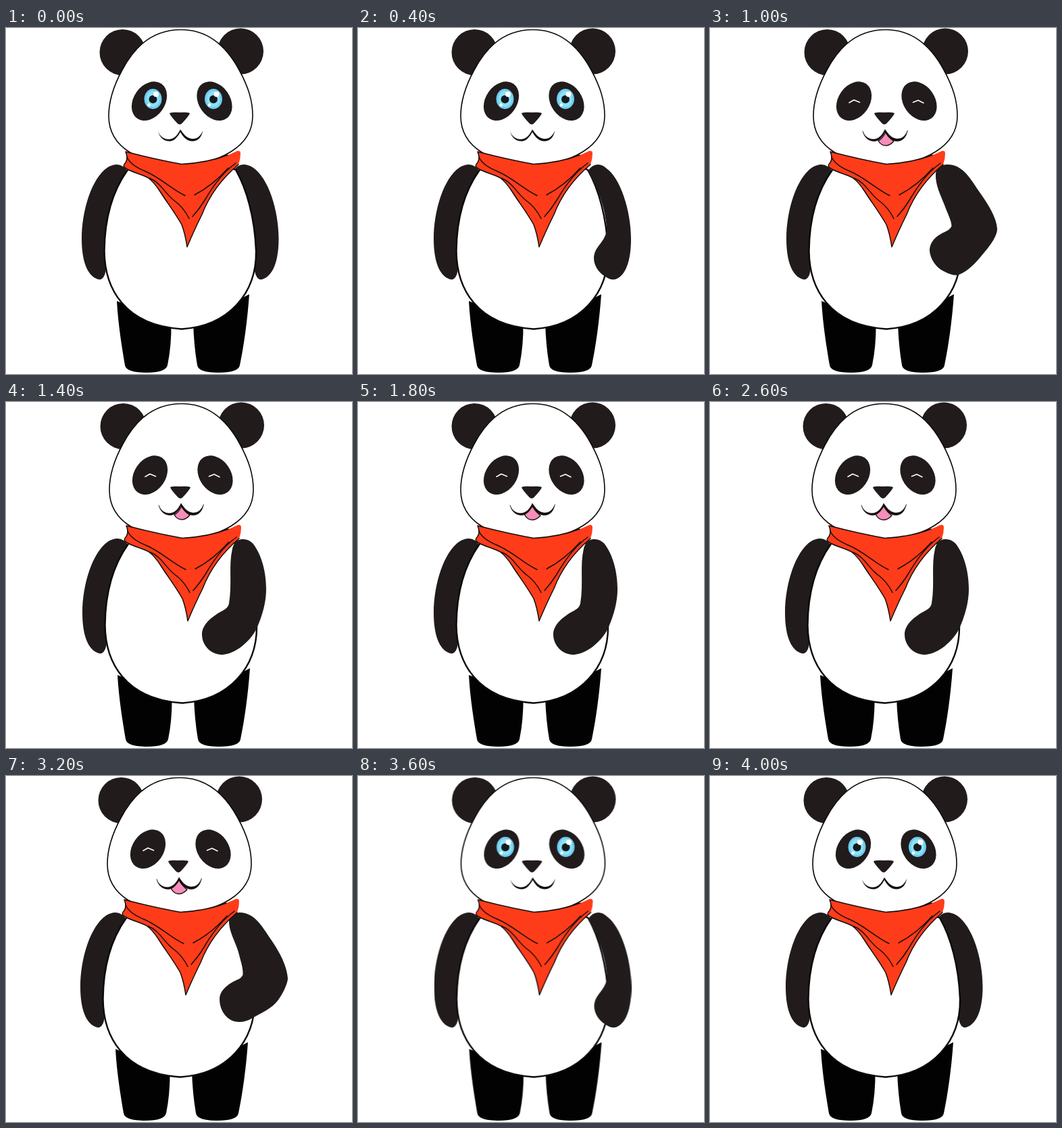
Animation, 512 px wide and 512 px high, one loop 4200 ms. Source, as an HTML page:

```html
<!DOCTYPE html>
<html lang="en">
<head>
<meta charset="utf-8">
<title>Panda rubbing its belly</title>
<style>
  html, body { margin: 0; width: 100%; height: 100%; overflow: hidden; background: #fff; }
  svg { display: block; width: 100vw; height: 100vh; }

  .fur { fill: #211b1c; }
  .skin { fill: #fff; stroke: #0b0909; }
  .line { fill: none; stroke: #120d0d; stroke-linecap: round; stroke-linejoin: round; }
  .shine { fill: #fff; }

  /* Every change is a hard cut on a 200 ms grid */
  .sway, .pose { animation: 4200ms step-end infinite; }
  .pose { visibility: hidden; }
  .sway { animation-name: sway; }
  .rest { animation-name: rest; }
  .curl { animation-name: curl; }
  .belly { animation-name: belly; }
  .lift { animation-name: lift; }
  .out { animation-name: out; }
  .awake { animation-name: awake; }
  .happy { animation-name: happy; }
  .tongue-a { animation-name: tongue-a; }
  .tongue-b { animation-name: tongue-b; }

  @keyframes sway {
    0%, 9.523%, 42.857%, 80.952%, 95.238% { transform: translateX(0); }
    4.761%, 14.285%, 38.095%, 52.38%, 85.714% { transform: translateX(.5px); }
    19.047% { transform: translateX(1px); }
    61.904%, 71.428% { transform: translateX(-1px); }
    66.666% { transform: translateX(-1.4px); }
    76.19% { transform: translateX(-2px); }
  }
  @keyframes rest {
    0%, 90.476% { visibility: visible; }
    9.523% { visibility: hidden; }
  }
  @keyframes curl {
    0%, 14.285%, 33.333%, 61.904%, 90.476% { visibility: hidden; }
    9.523%, 28.571%, 57.142%, 80.952% { visibility: visible; }
  }
  @keyframes belly {
    0%, 23.809%, 47.619%, 76.19% { visibility: hidden; }
    14.285%, 33.333%, 61.904% { visibility: visible; }
  }
  @keyframes lift {
    0%, 52.38%, 80.952% { visibility: hidden; }
    47.619%, 76.19% { visibility: visible; }
  }
  @keyframes out {
    0%, 28.571%, 57.142% { visibility: hidden; }
    23.809%, 52.38% { visibility: visible; }
  }
  @keyframes awake {
    0%, 85.714% { visibility: visible; }
    14.285% { visibility: hidden; }
  }
  @keyframes happy {
    0%, 85.714% { visibility: hidden; }
    14.285% { visibility: visible; }
  }
  @keyframes tongue-a {
    0%, 38.095% { visibility: hidden; }
    14.285% { visibility: visible; }
  }
  @keyframes tongue-b {
    0%, 85.714% { visibility: hidden; }
    38.095% { visibility: visible; }
  }
</style>
</head>
<body>
<svg viewBox="0 0 512 512">
  <defs>
    <path id="arm" d="M181 214Q174 202 164 202Q157 202 150 206.500C127 222 112 270 112 312C112 342 119 362 131 369.500Q140 375 144 369Q149 362 148 345Z"/>
    <g id="eye">
      <ellipse rx="13" ry="15" fill="#6fcdef"/>
      <ellipse rx="10" ry="12" fill="#8de0f5"/>
      <circle cy=".5" r="6" fill="#131a20"/>
      <circle class="shine" cx="4.500" cy="-7" r="4"/>
      <circle class="shine" cx="-6" cy="9" r="2.200"/>
    </g>
    <path id="mouth" d="M225 152.500C228 162 236 165.500 243 164.500C251 163 255 156 258 150C262 156 267 163 275 164C283 164.500 288 160 291.500 151.500C289 163 283 168 275 167.500C267 167 262 161 258 154C254 161 250 166.500 243 167.500C234 168 227 162 225 152.500Z"/>
  </defs>

  <g class="sway">
    <!-- legs and resting arms -->
    <path fill="#020203" d="M164 404C166 440 172 475 176 499Q178 510 208 510Q236 510 239 499Q245 470 244.500 436Z"/>
    <path fill="#020203" d="M277 436Q278 470 283 499Q285 510 314 510Q344 510 346 499C352 470 357 435 360 394Z"/>
    <use class="fur" href="#arm"/>
    <use class="fur pose rest" href="#arm" transform="matrix(-1 0 0 1 515.500 0)"/>

    <path class="skin" stroke-width="2.400" d="M180 210C160 238 146 275 145.500 330C146 385 175 440 260 445.500C330 441 371 392 370 330C368 280 356 238 340 210C300 190 220 190 180 210Z"/>

    <!-- raised arm -->
    <g class="fur">
      <path class="pose curl" d="M340 212Q346 202 355 202Q362 202 368 208C388 222 404 270 404 312C404 345 396 366 382 371.500Q375 374 366 368C355 361 349 351 349 340C350 323 364 319 368 300C368 278 358 240 340 212Z"/>
      <path class="pose belly" d="M348 203Q337 204 334 217C328 242 334 268 329 298Q328 304 321 308C302 318 289 330 289 344C289 360 302 374 319 374C338 373 360 355 370 335C379 315 384 295 384 277C384 251 377 225 364 209Q357 202 348 203Z"/>
      <path class="pose lift" d="M348 202Q334 202 332 213C331 229 342 246 346 261C350 277 353 284 352.500 294Q351 299 343 302C326 310 318 320 318 330C318 348 330 364 347 364Q357 364 367 358C379 351 391 346 400 337C412 325 419 305 419 300C418 278 402 253 392 239C382 224 370 202 348 202Z"/>
      <path class="pose out" d="M349 202Q334 203 333 216C332 232 341 249 346 262C351 276 356 284 356.500 293Q355 298 346 302C328 310 324 321 324 330C325 342 334 355 345 360Q358 367 366 365.500C379 361 390 350 400 338C412 324 424 309 424 297C423 280 410 260 398 243C386 226 374 201 349 202Z"/>
    </g>

    <!-- ears and head -->
    <g class="fur">
      <circle cx="172.500" cy="36" r="34"/>
      <circle cx="347" cy="34.500" r="34"/>
    </g>
    <path class="skin" stroke-width="1.600" d="M259 2.500C307 2.500 332 38 345 62C359 88 365 108 365 130C365 176 314 202 258 202C200 202 152 178 152 130C152 107 159 86 172 62C185 38 209 2.500 259 2.500Z"/>

    <!-- scarf -->
    <path fill="#ff3c19" d="M177 183C200 189 235 197 260 201.500C292 200 320 193 342 182Q347 181 347 186Q347 194 344 202C318 224 300 250 290 276Q279 298 268 324Q265 304 260 291C248 270 238 258 228 242Q219 228 210 221.500C200 216 187 214 176 207Q172 204 177 199Q181 193 177 183Z"/>
    <g class="line" stroke-width="1.500">
      <path d="M344 202C318 224 300 250 290 276Q279 298 268 324Q265 304 260 291C248 270 238 258 228 242Q219 228 210 221.500C200 216 187 214 176 207Q172 204 177 199Q181 193 177 183C200 189 235 197 260 201.500C285 200 310 195 328 188"/>
      <path d="M179 191Q184 203 206 212C228 221 244 238 265 248"/>
      <path d="M212 222C230 229 236 247 251 257Q263 266 271 282"/>
      <path d="M329 207Q306 233 279 247"/>
      <path d="M340 200C318 216 304 238 294 255Q286 268 276 279"/>
    </g>

    <!-- face -->
    <g class="fur">
      <ellipse cx="212" cy="108.200" rx="23.200" ry="31.300" transform="rotate(35 212 108.200)"/>
      <ellipse cx="308.500" cy="108.200" rx="23.200" ry="31.300" transform="rotate(-35 308.500 108.200)"/>
      <path d="M242 126.500Q243 124 257 125Q271 124 272 126.500Q270 131 260.500 141Q257 144.500 253.500 141Q244 131 242 126.500Z"/>
    </g>

    <g class="pose awake">
      <use href="#eye" x="217.500" y="105"/>
      <use href="#eye" x="307" y="105"/>
      <use href="#mouth" fill="#120d0d"/>
    </g>

    <g class="pose happy">
      <g class="line" stroke-width="1.600" style="stroke:#fff">
        <path d="M205 110.500L212 106.500L220.500 110"/>
        <path d="M299.500 110L307 107L315 111"/>
      </g>
      <g fill="#f78dba" stroke="#231517" stroke-width="1.500" stroke-linejoin="round">
        <path class="pose tongue-a" d="M259 154Q254 164 248 167Q252 174 260 174Q267 173 271 167Q264 163 259 154Z"/>
        <path class="pose tongue-b" d="M258 154Q253 163 246 166Q250 174 258 174.500Q265 174 270 168Q263 163 258 154Z"/>
      </g>
      <use href="#mouth" fill="#120d0d" stroke="#120d0d" stroke-width=".5"/>
    </g>
  </g>
</svg>
</body>
</html>
```
